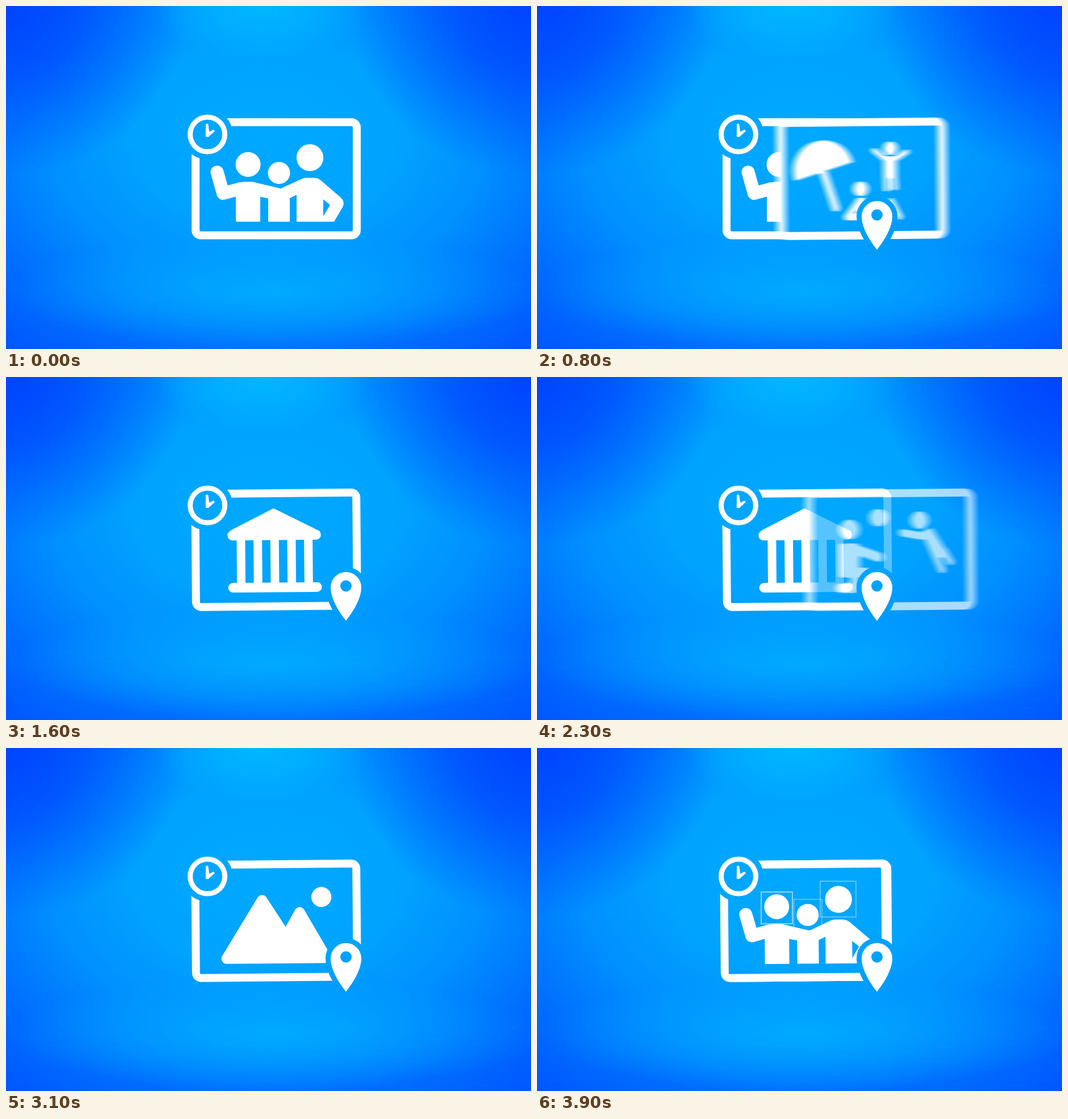
Write an HTML page with a canvas that moves like this. It is 925 px wide and 605 px high and loops after 4000 ms.

```html
<!DOCTYPE html>
<html lang="en">
<head>
<meta charset="utf-8">
<title>Photo memories</title>
<style>
  html, body { margin: 0; width: 100%; height: 100%; overflow: hidden; }
  body {
    background:
      radial-gradient(ellipse 190px 95px at 450px 0, #00b8ff, #00b4ffb0 50%, #00b0ff00),
      radial-gradient(ellipse 320px 300px at 0 0, #0044ff, #0048ffc0 40%, #0050ff00),
      radial-gradient(ellipse 320px 300px at 100% 0, #0044ff, #0048ffc0 40%, #0050ff00),
      radial-gradient(ellipse 470px 100px at 470px 505px, #00b0ffd0, #00a8ff90 45%, #00a0ff00),
      radial-gradient(ellipse 620px 440px at 462px 230px, #00a8ff, #00a4ff 35%, #0090ff 62%, #006eff 88%, #0054ff 115%);
  }
  canvas { display: block; }
</style>
</head>
<body>
<canvas id="stage" width="925" height="605"></canvas>
<script>
const W = 925, H = 605, LOOP = 4000, STEP = 100;
const TILT = -0.0085;

function layer(canvas = document.createElement('canvas')) {
  canvas.width = W;
  canvas.height = H;
  const g = canvas.getContext('2d');
  g.fillStyle = g.strokeStyle = '#fff';
  g.lineCap = g.lineJoin = 'round';
  return g;
}

const stage = layer(document.getElementById('stage'));
const smear = layer();

function dot(g, x, y, r) {
  g.beginPath();
  g.arc(x, y, r, 0, 7);
  g.fill();
}

function line(g, width, ...pts) {
  g.lineWidth = width;
  g.beginPath();
  for (let i = 0; i < pts.length; i += 2) g.lineTo(pts[i], pts[i + 1]);
  g.stroke();
}

function box(g, x, y, w, h, r = 0) {
  g.beginPath();
  g.roundRect(x, y, w, h, r);
  g.fill();
}

function shape(g, d, edge = 0) {
  const path = new Path2D(d);
  g.fill(path, 'evenodd');
  if (edge) {
    g.lineWidth = edge;
    g.stroke(path);
  }
}

function family(g) {
  dot(g, 426.5, 279.5, 22);
  dot(g, 481, 294.5, 19.5);
  dot(g, 535.5, 267.5, 23.7);
  line(g, 23, 372, 293, 382.5, 330.5, 412, 322.5);
  shape(g, `M408 312 L420 310 H434 L484 322 L521 305 Q525 303 530 303 H541 Q549 303 554 307
    L590 338 Q597 345 594 353 L578 380.5 H512 V333 L500 339 V380.5 H462 V339.5 L448 336.5
    V380.5 H405 V330 Z M559 341 L571 351 L559 371 Z`);
}

function beach(g) {
  g.beginPath();
  g.arc(409, 290, 52, Math.PI - 0.31, 2 * Math.PI - 0.31);
  g.closePath();
  g.fill();
  g.lineWidth = 3;
  g.stroke();
  line(g, 12.5, 409, 293, 430, 356);

  dot(g, 474, 322.5, 13);
  line(g, 12, 451, 372, 472, 344, 478, 344);
  line(g, 12, 451, 372, 475, 372);
  line(g, 15, 475, 346, 497, 371);
  line(g, 11, 497, 375, 526.5, 344.5, 541, 372);
  shape(g, 'M470 345 L480 342 L502 362 L494 379 L470 366 Z');

  dot(g, 527, 251.5, 12);
  line(g, 9, 499, 255, 517, 270, 536, 270, 555, 258);
  box(g, 514.5, 267, 23, 37, 3);
  line(g, 9.5, 519.5, 298, 520, 323);
  line(g, 9.5, 532.5, 298, 534, 321);
}

function museum(g) {
  shape(g, 'M472 236 L545 273 H399 Z', 8);
  box(g, 390.5, 270, 164.5, 17.5, 8.5);
  box(g, 391, 362.5, 165, 17, 8.5);
  for (let i = 0; i < 5; i++) box(g, 406.5 + i * 29.7, 285, 15, 80);
}

function game(g) {
  dot(g, 405, 268.5, 17.5);
  dot(g, 455.5, 248, 15.5);
  box(g, 388, 293, 35, 60, 6);
  line(g, 17, 410, 301.5, 455.5, 317.5);
  line(g, 17, 402, 344.5, 434, 344.5, 453, 367);
  line(g, 17, 413.5, 345, 413.5, 372, 389.5, 372);

  dot(g, 528.5, 253, 15.5);
  line(g, 13, 498.5, 275, 532, 281, 546, 274.5);
  shape(g, 'M537 276 L548 272 L573 312 L556 319 Z', 9);
  line(g, 11.5, 556, 317, 567, 341);
  line(g, 11.5, 570, 307, 582, 327);
}

function mountains(g) {
  shape(g, 'M388 371 L451.5 268 L493 333 L517.5 290 L564 371 Z', 18);
  dot(g, 556, 263.5, 17.7);
}

// Each card slides in through these horizontal offsets, one per step.
const cards = [
  { at: 0, slide: [0], draw: family, tilt: 0 },
  { at: 800, slide: [96, -2, -1, 0], draw: beach },
  { at: 1400, slide: [193, 14, 0], draw: museum },
  { at: 2300, slide: [146, -1, 0], draw: game },
  { at: 3000, slide: [96, 0], draw: mountains },
  { at: 3700, slide: [98, -5, -4], draw: family }
];

function render(tilt, draw) {
  const g = layer();
  g.translate(476, 304.5);
  g.rotate(tilt);
  g.translate(-476, -304.5);
  draw(g);
  return g.canvas;
}

for (const card of cards) {
  const tilt = card.tilt ?? TILT;
  card.solid = render(tilt, g => box(g, 327, 198, 298, 213.5, 17));
  card.art = render(tilt, g => {
    g.lineWidth = 14;
    g.beginPath();
    g.roundRect(334, 205, 284, 199.5, 9);
    g.stroke();
    card.draw(g);
  });
}

// Horizontal motion blur: the average of shifted copies.
function blurred(image, x) {
  const copies = x > 50 ? 17 : 1;
  smear.clearRect(0, 0, W, H);
  smear.globalCompositeOperation = 'lighter';
  smear.globalAlpha = 1 / copies;
  for (let i = 0; i < copies; i++) smear.drawImage(image, x + i - (copies - 1) / 2, 0);
  return smear.canvas;
}

function blend(mode, paint, alpha = 1) {
  stage.save();
  stage.globalCompositeOperation = mode;
  stage.globalAlpha = alpha;
  paint();
  stage.restore();
}

function drawCards(t) {
  const index = cards.findLastIndex(c => c.at <= t);
  const card = cards[index];
  const step = Math.min((t - card.at) / STEP, card.slide.length - 1);
  const x = card.slide[step];
  const alpha = Math.min(1, 1 - (x - 96) / 150);
  if (x) stage.drawImage(cards[index - 1].art, 0, 0);
  blend('destination-out', () => stage.drawImage(blurred(card.solid, x), 0, 0), alpha);
  blend('lighter', () => stage.drawImage(blurred(card.art, x), 0, 0), alpha);
}

function drawFaceBoxes() {
  stage.lineWidth = 2;
  for (const [x, y, w, h, alpha] of [[395, 254, 55, 56, .55], [452.5, 267, 49.5, 55, .3], [499, 235, 63, 63, .35]]) {
    stage.globalAlpha = alpha;
    stage.strokeRect(x, y, w, h);
  }
  stage.globalAlpha = 1;
}

function drawClock() {
  blend('destination-out', () => dot(stage, 355, 226.5, 44.5));
  stage.lineWidth = 9;
  stage.beginPath();
  stage.arc(355, 226.5, 30.5, 0, 7);
  stage.stroke();
  shape(stage, 'M352.8 208.5 L355.5 208.5 L357.5 223 L365.5 219 L367 220.5 L356 230.5 L352.5 230 Z', 1.5);
}

const pin = 'M599 430 C585 412 572 390 572 371 A27 27 0 0 1 626 371 C626 390 613 412 599 430 Z';
const hole = 'M609 368.5 A10 10 0 1 0 589 368.5 A10 10 0 1 0 609 368.5 Z';
const pinScale = [0, .4, .9, 1.2, 1];

function drawPin(t) {
  const s = pinScale[Math.min(t / STEP, 4)];
  if (!s) return;
  stage.save();
  stage.translate(599, 390);
  stage.scale(s, s);
  stage.translate(-599, -390);
  blend('destination-out', () => shape(stage, pin, 18));
  shape(stage, pin + hole);
  stage.restore();
}

// Faint scratches on the floor.
const scratches = new Path2D();
let seed = 7;
const random = () => (seed = seed * 16807 % 2147483647) / 2147483647;
for (let i = 0; i < 160; i++) {
  const x = random() * W, y = 490 + random() * 115;
  scratches.moveTo(x, y);
  scratches.lineTo(x + 15 + random() * 50, y + random() * 24 - 12);
}

function frame(now) {
  const t = Math.floor(now % LOOP / STEP) * STEP;
  stage.clearRect(0, 0, W, H);
  drawCards(t);
  if (t >= 3900) drawFaceBoxes();
  drawClock();
  drawPin(t);
  stage.lineWidth = 1;
  blend('source-over', () => stage.stroke(scratches), .025);
  requestAnimationFrame(frame);
}

const start = performance.now();
frame(0);
function tick() { return performance.now() - start; }
</script>
</body>
</html>
```
